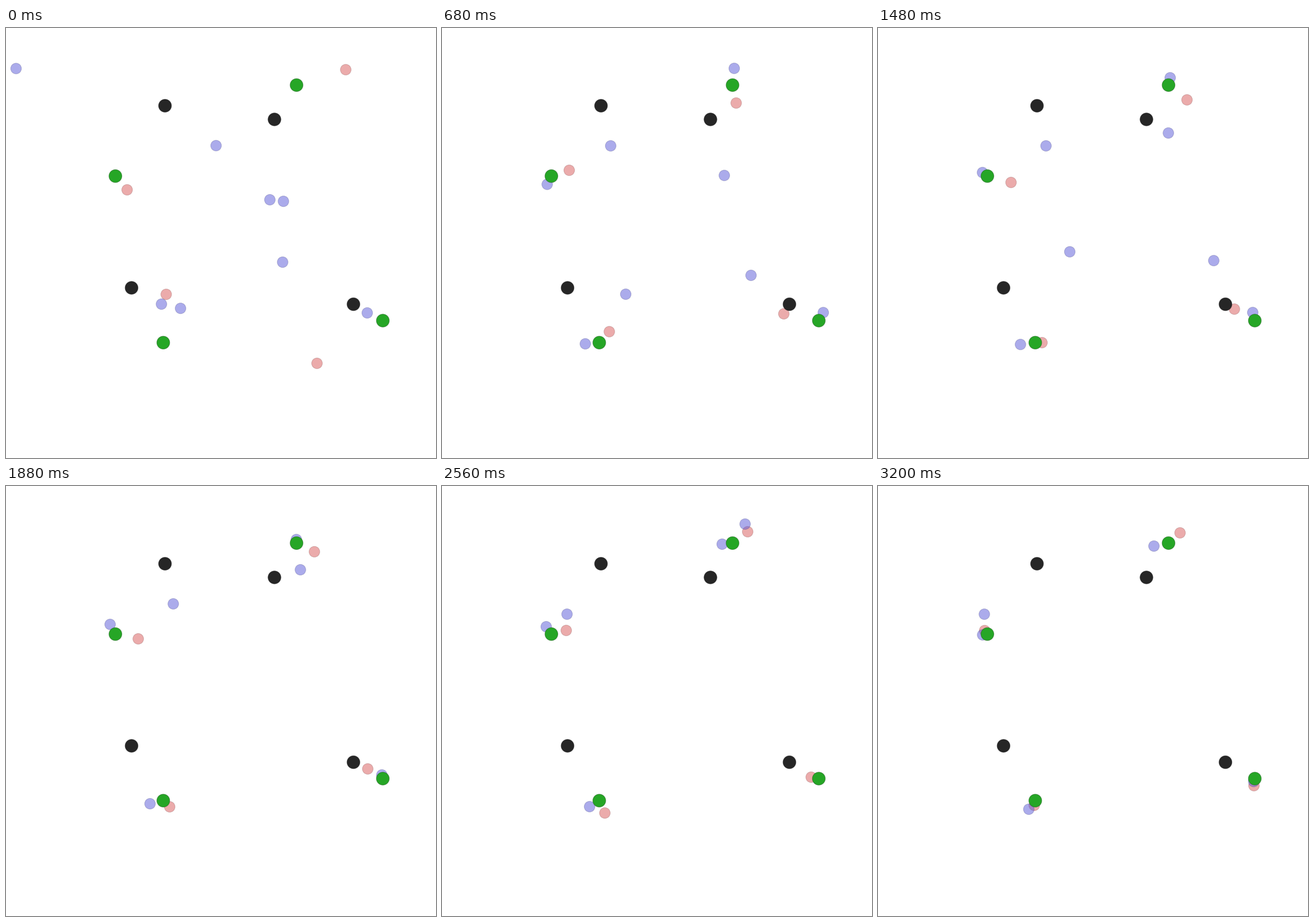
Recreate the animation shown at these times as a matplotlib script. Size 748 by 748 pixels, loop 3.24 s.

```python
import numpy as np
import matplotlib.pyplot as plt
from matplotlib.animation import FuncAnimation
from matplotlib.patches import Circle

SIZE, DPI = 748, 100
FRAMES, INTERVAL = 81, 40
DASH = 9    # frames in the opening dash
LEAVE = 47  # frame at which two strays drop out
T = np.arange(FRAMES)

RED, BLUE = (0.85, 0.35, 0.35), (0.35, 0.35, 0.85)
GREEN, BLACK = (0.15, 0.65, 0.15), (0.15, 0.15, 0.15)

fig = plt.figure(figsize=(SIZE / DPI, SIZE / DPI), dpi=DPI, facecolor="white")
ax = fig.add_axes([0, 0, 1, 1])
ax.set_xlim(0, SIZE)
ax.set_ylim(SIZE, 0)
ax.axis("off")


def disc(x, y, radius, color, alpha, z):
    """Filled disc with a half-bright, half-opaque rim."""
    rim = tuple(c * 0.5 for c in color) + (alpha * 0.5,)
    patch = Circle((x, y), radius, facecolor=color + (alpha,), edgecolor=rim,
                   linewidth=72 / DPI, zorder=z)
    return ax.add_patch(patch)


def ease(t, v):
    """Monotone cubic through (t, v), starting at rest, held after the last key."""
    h = np.diff(t)
    s = np.diff(v) / h
    m = np.zeros(len(t))
    m[-1] = s[-1]
    turn = s[:-1] * s[1:] <= 0
    m[1:-1] = np.where(turn, 0, 2 * s[:-1] * s[1:] / np.where(turn, 1, s[:-1] + s[1:]))
    f = np.minimum(T, t[-1])
    k = np.clip(np.searchsorted(t, f, side="right") - 1, 0, len(h) - 1)
    u = (f - t[k]) / h[k]
    blend = u * u * (3 - 2 * u)
    return (v[k] + (v[k + 1] - v[k]) * blend
            + h[k] * u * (1 - u) * ((1 - u) * m[k] - u * m[k + 1]))


def chase(start, near, *later):
    """Dash from start to near, then ease through a few (frame, x, y) stops."""
    t, x, y = np.array([(0, *start), (DASH, *near), *later], float).T
    return np.column_stack([ease(t, x), ease(t, y)])


def drift(start, base):
    """Settle onto a steady upward course from base that speeds up late."""
    t = T[:, None]
    course = (np.array(base) + np.array([0.7, -3.69]) * t
              + np.array([0.01, -0.052]) * np.maximum(t - 46, 0) ** 2)
    return course + np.subtract(start, base) * np.maximum(1 - t / DASH, 0) ** 2


agents = []


def agent(color, path, life=FRAMES):
    z = 1 if color == RED else 2
    agents.append((disc(*path[0], 9.35, color, 0.5, z), path, life))


# Fixed goals and obstacles
for x, y in ((190.3, 257.6), (505.4, 99.3), (273.6, 547.3), (655.5, 509)):
    disc(x, y, 11.22, GREEN, 1, 3)
for x, y in ((276.6, 135.2), (467, 159), (218.4, 452), (604.4, 480.5)):
    disc(x, y, 11.22, BLACK, 1, 3)

# Upper left goal
agent(RED, chase((210.7, 281.5), (210.6, 225), (25, 232, 270), (57, 228, 262),
                 (71, 199, 242), (80, 185.5, 251.5)))
agent(BLUE, chase((17.5, 70.5), (112, 256), (16, 183, 272), (52, 181, 239),
                  (80, 182, 259)))
agent(BLUE, chase((365.4, 204.6), (294.5, 205), (47, 291, 205), (71, 192.6, 227.6),
                  (80, 185, 223)))

# Upper right goal
agent(RED, chase((591, 72.5), (506, 146), (25, 522, 115), (37, 537.5, 125),
                 (71, 529.5, 74), (80, 525.4, 81.5)))
agent(BLUE, chase((459, 298.8), (482, 134.7), (18, 509, 69), (40, 508, 89),
                  (71, 480, 104.5)))
agent(BLUE, drift((482.6, 301.5), (479.2, 319.2)))

# Lower left goal
agent(RED, chase((278.7, 463.3), (295, 518.4), (25, 286.5, 534.7), (66, 283, 569),
                 (80, 271.8, 555.5)))
agent(BLUE, chase((270.4, 480.3), (255.4, 549.4), (25, 246.5, 549.4),
                  (80, 262.3, 562.3)))
agent(BLUE, drift((303.6, 487.7), (307.7, 525.8)), LEAVE)

# Lower right goal
agent(RED, chase((541, 583.3), (579.4, 504.5), (37, 620, 489), (80, 654, 521.3)))
agent(BLUE, chase((628.4, 495.6), (676, 500), (25, 650.5, 490), (57, 654.8, 508.5),
                  (80, 653.5, 514)))
agent(BLUE, chase((481.2, 407.3), (507, 424.8), (25, 564, 432.6), (47, 598, 368)),
      LEAVE)


def update(i):
    for patch, path, life in agents:
        patch.center = path[i]
        patch.set_visible(i < life)
    return [patch for patch, _, _ in agents]


anim = FuncAnimation(fig, update, frames=FRAMES, interval=INTERVAL,
                     repeat=True, repeat_delay=0, blit=False)
plt.show()
```
